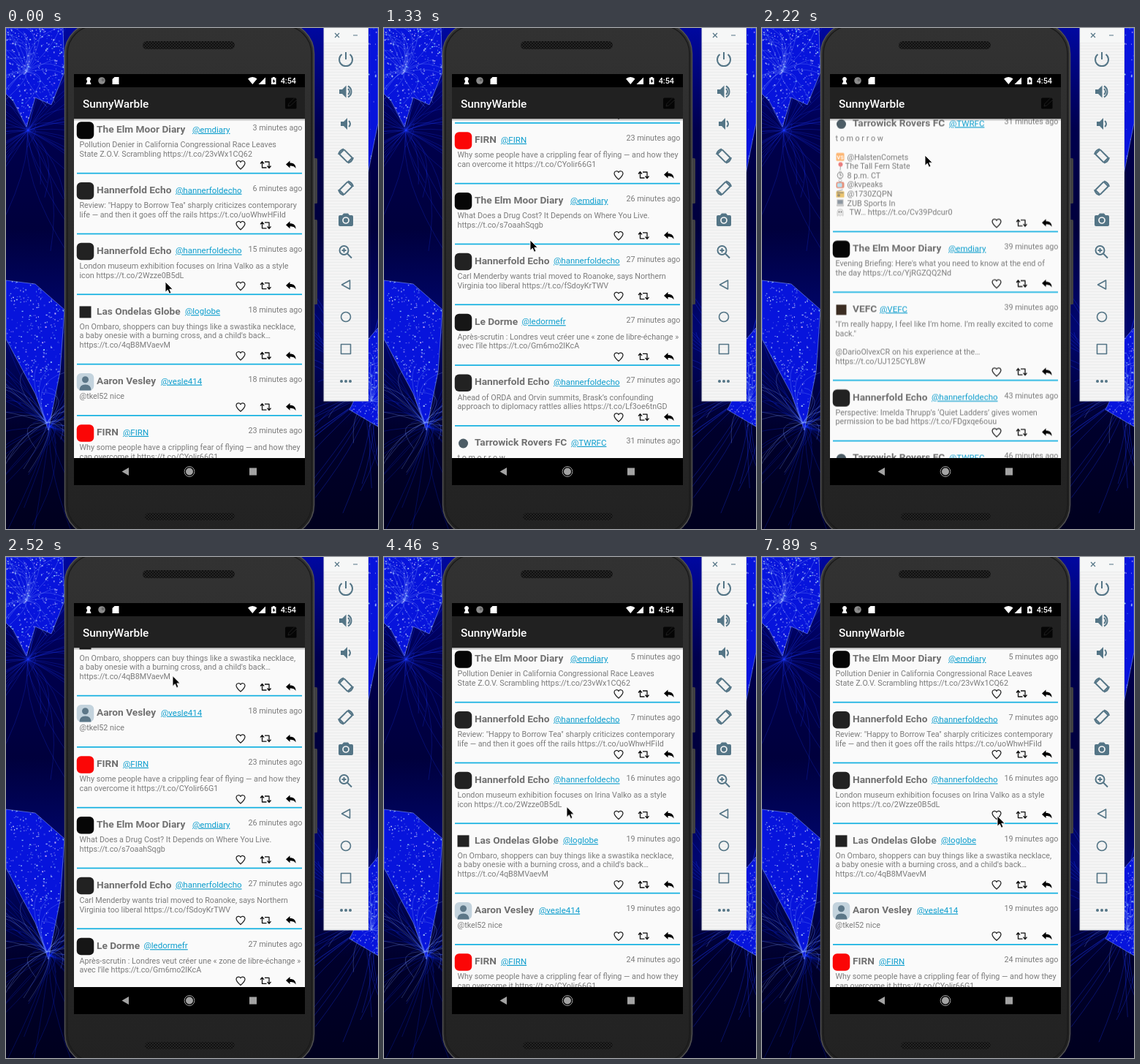
These frames come from a looping animation (509 px wide and 685 px high, 8000 ms). An HTML page with a canvas:

```html
<!DOCTYPE html>
<html lang="en">
<head>
<meta charset="utf-8">
<title>Feed on a phone emulator</title>
<style>
html, body { margin: 0; width: 100%; height: 100%; overflow: hidden; background: #00002e; }
canvas, svg { position: absolute; left: 0; top: 0; display: block; }
text { font-family: Roboto, Arial, sans-serif; white-space: pre; }
.body, .age { font-size: 10.75px; fill: #7b7b7b; }
.age { text-anchor: end; }
.name { font-size: 13.7px; font-weight: 700; fill: #707070; }
.handle { font-size: 11.5px; fill: #0b9dcd; text-decoration: underline; }
.line { fill: none; stroke-linejoin: round; }
#feed { animation: scroll 8s infinite; }
#pointer { animation: point 8s infinite; }
#glow { animation: glow 8s infinite; }
.before { animation: before 8s step-end infinite; }
.after { animation: after 8s step-end infinite; }
@keyframes before { 0% { opacity: 1; } 37.01%, 100% { opacity: 0; } }
@keyframes after { 0% { opacity: 0; } 37.01%, 100% { opacity: 1; } }
</style>
</head>
<body>
<canvas id="sky" width="509" height="685"></canvas>
<svg width="509" height="685" viewBox="0 0 509 685">
  <defs>
    <clipPath id="list"><rect x="93" y="124" width="316" height="464"/></clipPath>
    <linearGradient id="shade" x2="0" y2="1"><stop stop-opacity=".35"/><stop offset="1" stop-opacity="0"/></linearGradient>
    <linearGradient id="shell" x2="0" y2="1"><stop stop-color="#323232"/><stop offset="1" stop-color="#222"/></linearGradient>
    <pattern id="mesh" width="4" height="4" patternUnits="userSpaceOnUse"><rect width="4" height="4" fill="#111"/><circle cx="1" cy="1" r=".8" fill="#3c3c3c"/><circle cx="3" cy="3" r=".8" fill="#3c3c3c"/></pattern>
    <pattern id="stripe" width="4" height="4" patternUnits="userSpaceOnUse"><rect width="4" height="4" fill="#f4f4f4"/><rect width="4" height="1" fill="#ebecec"/></pattern>
    <g id="actions">
      <path class="line" stroke="#222" stroke-width="1.25" d="M321 6C318 3.5 315-.5 315-2.5A3.2 3.2 0 0 1 321-3.6 3.2 3.2 0 0 1 327-2.5C327-.5 324 3.5 321 6z"/>
      <path class="line" stroke="#111" stroke-width="1.3" d="M348-1.5l2.5-3 2.5 3M350.5-4.5v8.5h6M362.5 1.5l-2.5 3-2.5-3M360 4.5v-8.5h-6"/>
      <path d="M383-.5L388.5-5.5v3C394-2.5 396.5 0 396.5 5 395 2.5 393 1.5 388.5 1.5v3z"/>
    </g>
    <g id="turn">
      <rect x="-4.5" y="-8" width="9" height="16" rx="1" transform="rotate(-45)"/>
      <path d="M-10-2A10 10 0 0 1-3-9.5M10 2A10 10 0 0 1 3 9.5"/>
    </g>
  </defs>

  <!-- phone -->
  <rect x="421" y="178" width="5" height="62" rx="1.5" fill="#3f3f42"/>
  <rect x="421" y="262" width="5" height="116" rx="1.5" fill="#3f3f42"/>
  <rect x="80.5" y="-7" width="341" height="701" rx="42" fill="url(#shell)" stroke="#505050" stroke-width="1.5"/>
  <rect x="84" y="-3" width="334" height="693" rx="38" fill="none" stroke="#1b1b1b" stroke-width="1.5"/>
  <rect x="187" y="18" width="126" height="11" rx="5.5" fill="url(#mesh)"/>
  <rect x="190" y="663" width="123" height="10" rx="5" fill="url(#mesh)"/>
  <rect x="93" y="63" width="316" height="562"/>
  <rect x="93" y="81" width="316" height="43" fill="#212121"/>
  <rect x="93" y="124" width="316" height="464" fill="#fafafa"/>

  <!-- status bar -->
  <g fill="#fff">
    <path d="M113 67a3 3 0 0 1 1.8 5.4l1.7 4.6h-7l1.7-4.6A3 3 0 0 1 113 67z"/>
    <circle cx="131" cy="72" r="4.8" fill="#8b8b8b"/><circle cx="132.5" cy="71" r="2" fill="#6a6a6a"/>
    <path d="M148.5 67h6v10h-9v-7z"/>
    <path d="M331 69.5a9 9 0 0 1 12.5 0L337.3 77z"/>
    <path d="M355 67.5V77h-9.5z"/>
    <path d="M364.8 67h3v1.2h1.7V77h-6.5v-8.8h1.8z"/>
    <path fill="#000" d="M367 69.5l-2.5 3.7h1.5v2.5l2.3-3.7h-1.3z"/>
    <text x="397" y="76" text-anchor="end" font-size="10.8" font-weight="500">4:54</text>
    <text x="105" y="109" font-size="15.4" font-weight="500">SunnyWarble</text>
  </g>
  <rect x="382" y="95.5" width="15.5" height="15" rx="1.5" fill="#050505"/>
  <path d="M386 107l1-3.5 8.5-8.5 3 2.5-9 8.5z" fill="#050505" stroke="#262626" stroke-width=".8"/>

  <g clip-path="url(#list)">
    <g id="feed"></g>
    <ellipse id="glow" cx="251" cy="122" rx="190" ry="30" fill="#222" fill-opacity=".14"/>
    <rect x="93" y="124" width="316" height="3.5" fill="url(#shade)"/>
  </g>

  <!-- navigation bar -->
  <g fill="#a3a3a3">
    <path d="M168 601v11l-9.5-5.5z"/>
    <circle cx="251" cy="606.5" r="5"/><circle class="line" cx="251" cy="606.5" r="6.9" stroke="#a3a3a3"/>
    <rect x="333" y="601.5" width="10" height="10"/>
  </g>

  <!-- emulator controls -->
  <rect x="435" y="-2" width="60.5" height="512" fill="url(#stripe)" stroke="#d5d9dc"/>
  <rect x="435.5" y="0" width="59.5" height="20" fill="#f6f7f7"/>
  <g class="line" stroke="#547586" stroke-width="2">
    <path stroke-width="1.2" d="M450 7l6 6M456 7l-6 6M475 10h6"/>
    <path d="M465 33v10M459.5 36a9 9 0 1 0 11 0"/>
    <path d="M468 83a5 5 0 0 1 0 8M468 79.5a8.5 8.5 0 0 1 0 15"/>
    <path d="M469 127a5 5 0 0 1 0 8"/>
    <use href="#turn" x="465" y="175"/>
    <use href="#turn" transform="translate(465 219) scale(-1 1)"/>
    <circle cx="462.5" cy="304" r="6"/><path d="M467 308.5l6 6M459.5 304h6M462.5 301v6"/>
    <path stroke-width="1.6" d="M470.5 345v12l-11-6z"/>
    <circle cx="465" cy="395" r="6.5" stroke-width="1.6"/>
    <rect x="458.5" y="432.5" width="13" height="13" stroke-width="1.6"/>
  </g>
  <g fill="#547586">
    <path d="M456 84h4l5.5-5.5v17L460 90h-4z"/>
    <path d="M458 128h4l5-5v16l-5-5h-4z"/>
    <path d="M462 253.5h6l2 2.5h3q2 0 2 2v11q0 2-2 2h-16q-2 0-2-2v-11q0-2 2-2h3z"/>
    <circle cx="465" cy="263" r="4" stroke="#f4f4f4" stroke-width="1.7"/>
    <circle cx="459" cy="483" r="2"/><circle cx="465" cy="483" r="2"/><circle cx="471" cy="483" r="2"/>
  </g>

  <path id="pointer" d="M0 0V14.3L3.3 11.2 5.5 16.3 8 15.2 5.8 10.2H10.2z" stroke="#fff" stroke-width=".9"/>
</svg>

<script>
// Stepped tracks: keys are [step, ...values], linear between keys.
const percent = k => Math.max(0, 1.86 * k - 0.19).toFixed(2);
function track(name, keys, css) {
  const rows = keys.map(([k, ...v], i) => {
    const n = i + 1 < keys.length ? keys[i + 1][0] - k : 1;
    return `${percent(k)}% { ${css(...v)}; animation-timing-function: steps(${n}); }`;
  });
  rows.push(`100% { ${css(...keys[keys.length - 1].slice(1))}; }`);
  const style = document.createElement('style');
  style.textContent = `@keyframes ${name} { ${rows.join(' ')} }`;
  document.head.append(style);
}

const square = (size, color, r = 0) => y =>
  `<rect x="${108.5 - size / 2}" y="${y + 16 - size / 2}" width="${size}" height="${size}" rx="${r}" fill="${color}"/>`;
const person = y => square(23.5, '#c3d3dd', 6)(y) +
  `<g fill="#5c7788"><circle cx="108.5" cy="${y + 13}" r="4.5"/><path d="M100.5 ${y + 27.7}q0-8 8-8t8 8z"/></g>`;

// name, handle, handle x, avatar
const people = {
  elm: ['The Elm Moor Diary', '@emdiary', 255, square(23.5, '#060606', 6)],
  echo: ['Hannerfold Echo', '@hannerfoldecho', 232, square(23.5, '#222', 6)],
  globe: ['Las Ondelas Globe', '@loglobe', 245, square(16, '#222')],
  aaron: ['Aaron Vesley', '@vesle414', 212, person],
  firn: ['FIRN', '@FIRN', 160, square(23.5, '#fb0606', 6)],
  dorme: ['Le Dorme', '@ledormefr', 188.5, square(23.5, '#161616', 6)],
  rovers: ['Tarrowick Rovers FC', '@TWRFC', 256, y => `<circle cx="108.5" cy="${y + 16}" r="6.5" fill="#4d5d66"/>`],
  vefc: ['VEFC', '@VEFC', 161, square(14, '#3b2d22')]
};

// Small pictographs on an 11 px square, used as {x} at the start of a line.
const pics = {
  v: '<rect width="11" height="11" rx="1.5" fill="#ff8a1c"/><text x="5.5" y="8.3" font-size="7.5" font-weight="700" fill="#fff" text-anchor="middle">VS</text>',
  p: '<path d="M5 11L5.5 5h1L6 11z" fill="#777"/><circle cx="6" cy="3" r="3" fill="#e02a2a"/>',
  w: '<path d="M3.5 0h4v11h-4z" fill="#999"/><circle cx="5.5" cy="5.5" r="4" fill="#eee" stroke="#555"/><path d="M5.5 3v2.5h2" fill="none" stroke="#333"/>',
  t: '<rect y="2" width="11" height="8.5" rx="2" fill="#d8512d"/><rect x="1.5" y="3.5" width="6.5" height="5.5" rx="1" fill="#8fd0ea"/><path d="M3 0l2.5 2L8 0" fill="none" stroke="#555"/>',
  r: '<rect y="2" width="11" height="8.5" rx="1" fill="#e0a014"/><path d="M1 4h9" stroke="#5a4a20" stroke-width="1.5"/><circle cx="3.5" cy="7.5" r="2" fill="#5a4a20"/><path d="M1 2l8-2" stroke="#555"/>',
  l: '<rect x="1.5" y="1" width="8" height="6" fill="#456" stroke="#999"/><path d="M0 8h11l-1 2H1z" fill="#999"/>',
  g: '<path d="M1.5 10.5V5a4 4 0 0 1 8 0v5.5l-2-1.5-2 1.5-2-1.5z" fill="#ddd" stroke="#999" stroke-width=".7"/><circle cx="4" cy="5" r=".9"/><circle cx="7" cy="5" r=".9"/>'
};
const inset = { p: 113.8, g: 119.5 };

const posts = [
  ['elm', 3, 'Pollution Denier in California Congressional Race Leaves|State Z.O.V. Scrambling https://t.co/23vWx1CQ62', 5],
  ['echo', 6, 'Review: "Happy to Borrow Tea" sharply criticizes contemporary|life — and then it goes off the rails https://t.co/uoWhwHFiId'],
  ['echo', 15, 'London museum exhibition focuses on Irina Valko as a style|icon https://t.co/2Wzze0B5dL'],
  ['globe', 18, "On Ombaro, shoppers can buy things like a swastika necklace,|a baby onesie with a burning cross, and a child's back…|https://t.co/4qB8MVaevM"],
  ['aaron', 18, '@tkel52 nice'],
  ['firn', 23, 'Why some people have a crippling fear of flying — and how they|can overcome it https://t.co/CYolir66G1'],
  ['elm', 26, 'What Does a Drug Cost? It Depends on Where You Live.|https://t.co/s7oaahSqgb'],
  ['echo', 27, 'Carl Menderby wants trial moved to Roanoke, says Northern|Virginia too liberal https://t.co/fSdoyKrTWV'],
  ['dorme', 27, "Après-scrutin : Londres veut créer une « zone de libre-échange »|avec l'île https://t.co/Gm6mo2lKcA"],
  ['echo', 27, 'Ahead of ORDA and Orvin summits, Brask’s confounding|approach to diplomacy rattles allies https://t.co/Lf3oe6tnGD'],
  ['rovers', 31, 't o m o r r o w||{v}@HalstenComets|{p}The Tall Fern State|{w}8 p.m. CT|{t}@kvpeaks|{r}@1730ZQPN|{l}ZUB Sports In|{g}TW… https://t.co/Cv39Pdcur0'],
  ['elm', 39, "Evening Briefing: Here's what you need to know at the end of|the day https://t.co/YjRGZQQ2Nd"],
  ['vefc', 39, '"I’m really happy, I feel like I’m home. I’m really excited to come|back."||@DarioOlvexCR on his experience at the…|https://t.co/UJ125CYL8W'],
  ['echo', 43, 'Perspective: Imelda Thrupp’s ‘Quiet Ladders’ gives women|permission to be bad https://t.co/FDgxqe6ouu'],
  ['rovers', 46, '']
];

const LINE = 12.6;
const label = (cls, x, y, s) => `<text class="${cls}" x="${x}" y="${y}">${s}</text>`;
function textLine(s, y) {
  const m = s.match(/^\{(.)\}(.*)/);
  if (!m) return label('body', 100.5, y, s);
  return `<g transform="translate(101.5 ${y - 9.3})" opacity=".6">${pics[m[1]]}</g>` +
    label('body', inset[m[1]] || 116.5, y, m[2]);
}

let nextY = 124;
document.getElementById('feed').innerHTML = posts.map(([who, mins, text, later = mins + 1]) => {
  const y = nextY, [name, handle, hx, avatar] = people[who], lines = text.split('|');
  const h = lines.length * LINE;
  nextY += 57.6 + h;
  return avatar(y) + label('name', 124, y + 19.2, name) + label('handle', hx, y + 18.8, handle) +
    label('age before', 405.5, y + 16.2, mins + ' minutes ago') +
    label('age after', 405.5, y + 16.2, later + ' minutes ago') +
    lines.map((s, i) => textLine(s, y + 39.4 + i * LINE)).join('') +
    `<use href="#actions" y="${y + 37.8 + h}"/>` +
    `<rect x="97" y="${y + 48.6 + h}" width="308" height="1.7" fill="#12b0e0"/>`;
}).join('');

track('scroll', [[0, 0], [2, 0], [3, 36], [5, 139], [7, 285], [9, 400], [11, 464.7], [12, 530],
  [15, 836.5], [16, 640], [17, 270], [18, 0]], y => `transform: translateY(${-y}px)`);
track('point', [[0, 218, 347], [1, 213, 355], [2, 213, 355], [3, 214, 320], [5, 218, 233], [7, 220, 190],
  [9, 200, 290], [11, 195, 246], [12, 202, 290], [15, 223, 174], [16, 226, 155], [18, 230, 170],
  [21, 235, 236], [23, 242, 562], [25, 246, 532], [26, 246, 532], [29, 254, 151], [31, 246, 532],
  [33, 246, 532], [36, 290, 400], [38, 344, 218], [40, 322, 306], [41, 320, 300], [43, 305, 292],
  [46, 325, 465], [49, 326, 411], [50, 330, 398], [53, 322, 354]],
  (x, y) => `transform: translate(${x}px, ${y}px)`);
track('glow', [[0, 0], [18, 0], [19, 1], [21, .4], [25, 0]], o => `opacity: ${o}`);

// Wallpaper: night map with glowing arcs
const c = document.getElementById('sky').getContext('2d');
let seed = 7;
const rnd = () => (seed = seed * 16807 % 2147483647) / 2147483647;
const spread = r => (rnd() - .5) * 2 * r;
const sky = c.createLinearGradient(0, 0, 0, 685);
['#0008a0', '#00004e', '#00003c', '#000670', '#00002c', '#00001e'].forEach((s, i) => sky.addColorStop(i / 5, s));
c.fillStyle = sky;
c.fillRect(0, 0, 509, 685);

function fan(x, y, n, reach, color) {
  c.strokeStyle = color;
  c.lineWidth = .7;
  for (let i = 0; i < n; i++) {
    const ex = x + spread(reach), ey = y + spread(reach);
    c.beginPath();
    c.moveTo(x, y);
    c.quadraticCurveTo((x + ex) / 2 + spread(40), (y + ey) / 2 - 20, ex, ey);
    c.stroke();
  }
}
function land(points, lights) {
  const shape = new Path2D('M' + points.join('L') + 'Z');
  c.save();
  c.fillStyle = '#0714dc';
  c.fill(shape);
  c.strokeStyle = 'rgba(150,180,255,.7)';
  c.stroke(shape);
  c.clip(shape);
  const xs = points.map(p => p[0]), ys = points.map(p => p[1]);
  const x0 = Math.min(...xs), y0 = Math.min(...ys);
  const w = Math.max(...xs) - x0, h = Math.max(...ys) - y0;
  for (let i = 0; i < lights; i++) {
    c.fillStyle = `rgba(${150 + 100 * rnd()},${190 + 60 * rnd()},255,${.2 + .6 * rnd()})`;
    c.fillRect(x0 + w * rnd(), y0 + h * rnd(), .7 + 1.6 * rnd(), .7 + 1.6 * rnd());
  }
  c.restore();
}
fan(30, 140, 60, 200, 'rgba(30,60,255,.35)');
fan(60, 545, 60, 190, 'rgba(20,50,255,.35)');
fan(500, 500, 90, 200, 'rgba(30,60,255,.45)');
land([[0, 0], [78, 0], [80, 60], [62, 105], [40, 95], [28, 135], [10, 100], [0, 90]], 420);
land([[0, 345], [40, 350], [80, 385], [74, 470], [58, 550], [40, 500], [0, 425]], 420);
land([[495, 0], [509, 0], [509, 130], [495, 200]], 30);
land([[496, 425], [509, 410], [509, 545], [470, 522], [490, 480]], 200);
fan(28, 60, 30, 75, 'rgba(140,170,255,.4)');
fan(56, 540, 26, 80, 'rgba(130,160,255,.4)');
fan(500, 510, 24, 70, 'rgba(140,170,255,.4)');
</script>
</body>
</html>
```
